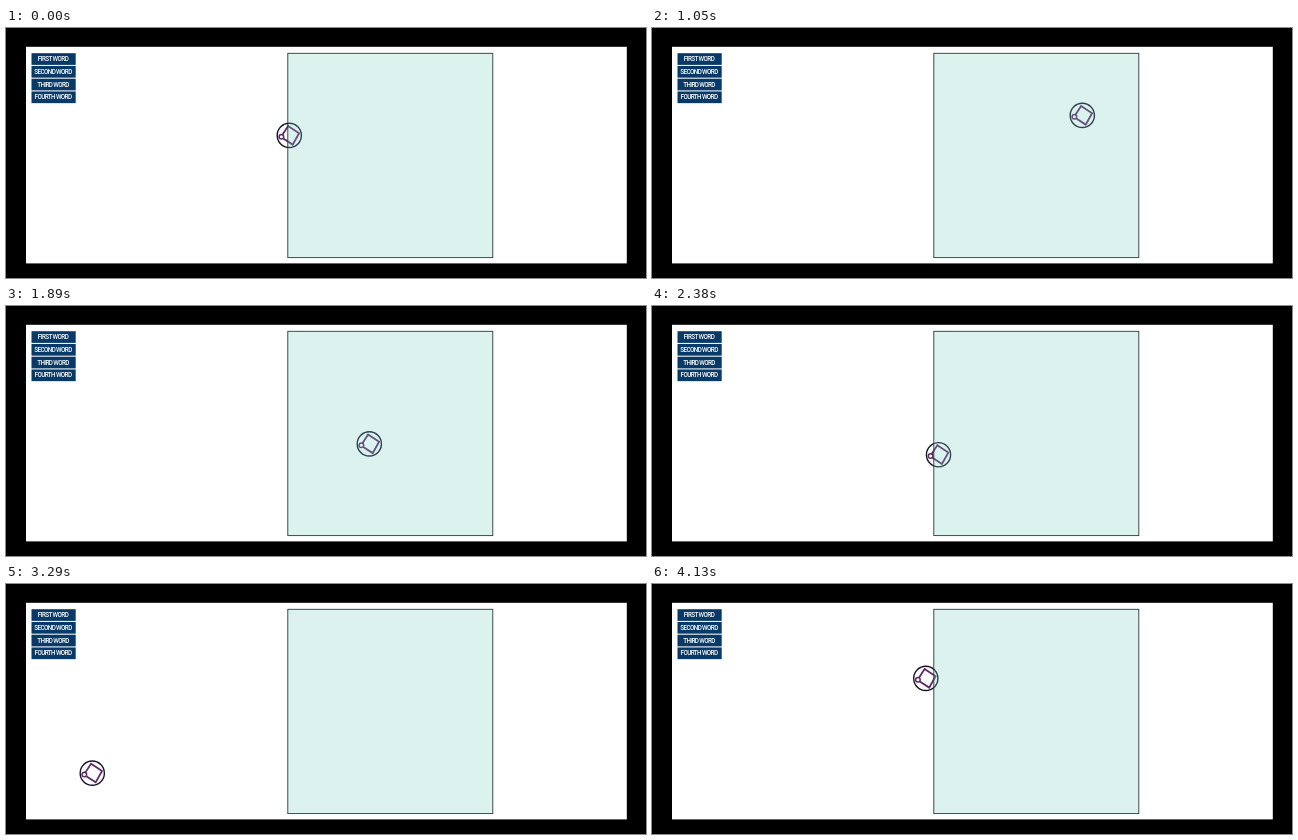
Recreate the animation shown at these times as an HTML page with a canvas. Size 640 by 250 pixels, loop 4.2 s.

```html
<!DOCTYPE html>
<html lang="en">
<head>
<meta charset="utf-8">
<title>Draggable words</title>
<style>
html, body { margin: 0; width: 100%; height: 100%; overflow: hidden; background: #000; }
canvas { display: block; }
</style>
</head>
<body>
<canvas id="c" width="640" height="250"></canvas>
<script>
const ctx = document.getElementById('c').getContext('2d');
const LOOP = 4200, STEP = 70, PAUSE = 41;
const PURPLE = '#5e2a66';
const labels = ['FIRST WORD', 'SECOND WORD', 'THIRD WORD', 'FOURTH WORD'];

// Drag path: step, x, y
const path = [
  [0, 283, 107], [9, 371.5, 98], [15, 430, 87], [16, 436, 91],
  [27, 363, 137.5], [32, 325, 146], [40, 145, 156], [41, 128, 165],
  [43, 106, 180], [47, 83, 190], [51, 95, 187], [55, 230, 113],
  [57, 275, 93.5], [58, 273.5, 94]
];

function slope(i, k) {
  const a = path[Math.max(i - 1, 0)], b = path[Math.min(i + 1, path.length - 1)];
  return (b[k] - a[k]) / (b[0] - a[0]);
}

function position(s) {
  let i = 0;
  while (i < path.length - 2 && s >= path[i + 1][0]) i++;
  const a = path[i], b = path[i + 1], d = b[0] - a[0], u = (s - a[0]) / d;
  const h = u * u * (3 - 2 * u);
  return [1, 2].map(k =>
    a[k] + (b[k] - a[k]) * h +
    d * u * (1 - u) * ((1 - u) * slope(i, k) - u * slope(i + 1, k)));
}

function circle(x, y, r, color, width) {
  ctx.beginPath();
  ctx.arc(x, y, r, 0, Math.PI * 2);
  ctx.strokeStyle = color;
  ctx.lineWidth = width;
  ctx.stroke();
}

function drawIcon(x, y) {
  ctx.save();
  ctx.translate(x + 0.3, y + 0.4);
  circle(0, 0, 12.1, '#17142a', 1.4);
  ctx.beginPath();
  ctx.moveTo(-7, -0.5);
  ctx.lineTo(-1.2, -9.4);
  ctx.lineTo(9.8, -2.2);
  ctx.lineTo(3.4, 9.2);
  ctx.lineTo(-6, 3);
  ctx.lineWidth = 1.8;
  ctx.strokeStyle = PURPLE;
  ctx.stroke();
  circle(-7.9, 1.3, 2.3, PURPLE, 1.5);
  ctx.restore();
}

function drawMenu() {
  ctx.font = '500 6.3px Roboto, "Liberation Sans", sans-serif';
  ctx.letterSpacing = '-0.6px';
  ctx.textAlign = 'center';
  labels.forEach((label, i) => {
    const y = 25.2 + 12.75 * i;
    ctx.fillStyle = '#073a68';
    ctx.fillRect(25.5, y, 44.2, 11.7);
    ctx.fillStyle = '#fff';
    ctx.fillText(label, 47, y + 8);
  });
}

function draw(ms) {
  let step = Math.floor((ms % LOOP) / STEP);
  if (step > PAUSE) step--;
  ctx.fillStyle = '#000';
  ctx.fillRect(0, 0, 640, 250);
  ctx.fillStyle = '#fff';
  ctx.fillRect(20, 18.8, 600.8, 216.6);
  drawMenu();
  drawIcon(...position(step));
  // The drop area is a translucent sheet above the icon
  ctx.fillStyle = 'rgba(115, 203, 191, 0.25)';
  ctx.fillRect(281.8, 25.3, 205, 204.3);
  ctx.strokeStyle = '#2c3a3a';
  ctx.lineWidth = 0.9;
  ctx.strokeRect(281.8, 25.3, 205, 204.3);
}

const start = performance.now();
function tick() {
  draw(performance.now() - start);
  requestAnimationFrame(tick);
}
tick();
</script>
</body>
</html>
```
